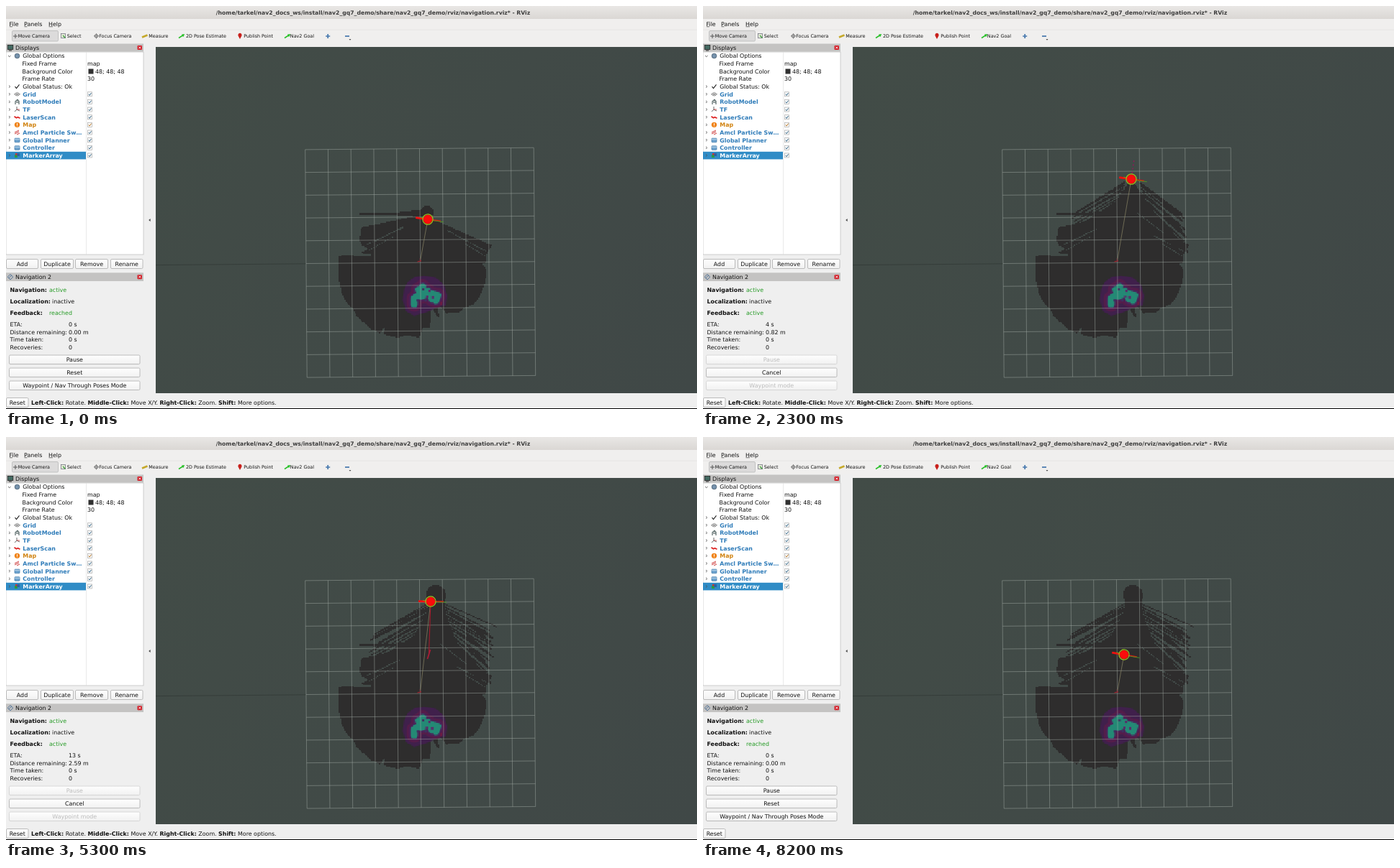
Write an HTML page with a canvas that moves like this. It is 960x561 px and loops after 8300 ms.

```html
<!DOCTYPE html>
<html lang="en">
<head>
<meta charset="utf-8">
<title>Navigation</title>
<style>
html, body { margin: 0; width: 100%; height: 100%; overflow: hidden; background: #efefef; }
canvas, svg { position: absolute; left: 0; top: 0; width: 960px; height: 561px; }
text { font: 7.9px "DejaVu Sans", sans-serif; fill: #111; white-space: pre; text-rendering: geometricPrecision; }
.b { font-weight: bold; }
.tool { font-size: 6.4px; }
.title { font-size: 7.7px; font-weight: bold; fill: #3d3d3d; }
.blue { fill: #2f7cb9; font-weight: bold; }
.orange { fill: #d0820f; font-weight: bold; }
.white { fill: #fff; font-weight: bold; }
.green { fill: #249a24; }
.off { fill: #bcbcbc; }
</style>
</head>
<body>
<canvas id="view" width="960" height="561"></canvas>
<svg id="ui" viewBox="0 0 960 561"></svg>
<script>
const LOOP = 8300, STEP = 100, METER = 31.7;
const $ = id => document.getElementById(id);
const rand = n => { const v = Math.sin(n * 127.1) * 43758.5; return v - Math.floor(v); };

// ---------- interface ----------
const text = (x, y, s, cls = '', more = '') => `<text x="${x}" y="${y + 2.9}" class="${cls}" ${more}>${s}</text>`;
const rect = (x, y, w, h, fill, more = '') => `<rect x="${x}" y="${y}" width="${w}" height="${h}" fill="${fill}" ${more}/>`;
const path = (d, color, w = 1) => `<path d="${d}" fill="none" stroke="${color}" stroke-width="${w}"/>`;
const middle = 'text-anchor="middle"', end = 'text-anchor="end"';

const button = (x, y, w, h, label, id = '') =>
  rect(x + .5, y + .5, w - 1, h - 1, 'url(#btn)', `rx="1.5" stroke="#b5b5b5" stroke-width=".9" ${id && `id="${id}Box"`}`) +
  text(x + w / 2, y + h / 2, label, '', `${middle} ${id && `id="${id}"`}`);

const header = (y, h, label) =>
  rect(0, y, 191, h, '#c4c3c2') + text(13, y + h / 2, label) +
  rect(182.5, y + h / 2 - 3, 6.5, 6, '#d3202a', 'rx="1"') +
  path(`M184.4 ${y + h / 2 - 1.4}l2.8 2.8m0-2.8l-2.8 2.8`, '#fff', .9);

function tools() {
  const items = [[61, 'Move Camera'], [104.5, 'Select'], [174.5, 'Focus Camera'], [225.5, 'Measure'],
    [306, '2D Pose Estimate'], [371, 'Publish Point'], [428, 'Nav2 Goal']];
  const goal = x => path(`M${x} 44.5l7-4.5m-2.8 .3l2.8-.3-1 2.6`, '#2bc02b', 1.5);
  return rect(8.5, 34.5, 64, 14.5, '#dcdbdb', 'id="camBox" rx="1.5" stroke="#b9b9b9" stroke-width=".8"') +
    rect(384.5, 34.5, 55.5, 14.5, '#dcdbdb', 'id="goalBox" rx="1.5" stroke="#b9b9b9" stroke-width=".8"') +
    items.map(([x, s]) => text(x, 41.4, s, 'tool', end)).join('') +
    path('M10 42h6m-3-3v6', '#555') +
    rect(76.5, 38.5, 6, 6, '#e6ecd8', 'stroke="#667" stroke-width=".7"') + path('M79 41l3.5 3.5', '#3a9a3a', 1.2) +
    '<circle cx="125.5" cy="41.8" r="2.3" fill="none" stroke="#555" stroke-width=".8"/>' + path('M121.8 41.8h7.4m-3.7-3.7v7.4', '#666', .7) +
    path('M189 43.5l7.5-3', '#c5a92b', 2.6) + goal(240) + goal(387) +
    '<path d="M325 46l-2.4-4.6a2.6 2.6 0 1 1 4.8 0z" fill="#c8201c"/>' +
    path('M444.2 42h6m-3-3v6', '#4476ad', 1.7) + path('M471 42h6', '#4476ad', 1.7) +
    '<path d="M476.5 46h3l-1.5 1.7z" fill="#444"/>';
}

function tree() {
  const rows = [['Global Options', ''], ['Fixed Frame', '', 'map'], ['Background Color', '', '48; 48; 48'], ['Frame Rate', '', '30'],
    ['Global Status: Ok', ''], ['Grid', 'blue'], ['RobotModel', 'blue'], ['TF', 'blue'], ['LaserScan', 'blue'], ['Map', 'orange'],
    ['Amcl Particle Sw…', 'blue'], ['Global Planner', 'blue'], ['Controller', 'blue'], ['MarkerArray', 'white']];
  const icons = {
    0: y => `<circle cx="15.5" cy="${y}" r="3.3" fill="#7793ad" stroke="#43586c" stroke-width=".8"/>`,
    4: y => path(`M12.5 ${y}l2 2.5 4-5.2`, '#222', 1.1),
    5: y => path(`M11.5 ${y}l4-2.4 4 2.4-4 2.4zm2-1.2l4 2.4m0-2.4l-4 2.4`, '#555', .7),
    6: y => path(`M13 ${y + 3.5}v-4l3-2.5 2 2v4.5m-4-3h4`, '#566', 1.2),
    7: y => path(`M12 ${y + 3}l3-3 4 2m-4-2v-4`, '#666', 1) + path(`M15 ${y}h4`, '#c33', .8),
    8: y => path(`M11.5 ${y - 1}l3 2 2-1 3 1.5`, '#d22', 1.8),
    9: y => `<circle cx="15.5" cy="${y}" r="3.7" fill="#f08418"/>` + path(`M15.5 ${y - 2.2}v2.8m0 .7v1`, '#fff', 1),
    10: y => path(`M12 ${y}l6-3m-6 5l6-3m-3 4l4-2`, '#c33', 1),
    11: y => rect(12, y - 2.5, 7, 5.5, '#6fa4cf', 'rx=".7" stroke="#3c77a8" stroke-width=".7"') + path(`M12 ${y - 1}h7`, '#d7e8f4', .8),
    13: y => rect(12, y - 1, 4, 4, '#2d9b43') + rect(15, y - 3, 4, 4, '#3160a0') + rect(13, y - 3, 2.4, 2.4, '#c33')
  };
  icons[12] = icons[11];
  return rect(0, 64, 191, 282, '#fff', 'stroke="#bbb" stroke-width=".7"') + rect(111, 64, .6, 282, '#ddd') +
    rect(0, 202.8, 111, 10.6, '#308cc6') +
    rows.map(([name, cls, value], i) => {
      const y = 69.5 + i * 10.65;
      let s = text(i && (i < 4 || i === 4) ? (i < 4 ? 22.5 : 23.3) : 23.3, y, name, cls);
      if (value) s += text(i === 2 ? 124 : 113, y, value);
      if (icons[i]) s += icons[i](y);
      if (i > 3) s += path(`M4 ${y - 1.6}l1.7 1.6-1.7 1.6`, '#555', .9);
      if (i > 4) s += rect(113.4, y - 3, 6, 6, '#fff', 'stroke="#aaa" stroke-width=".7"') +
        path(`M114.8 ${y}l1.4 1.7 2.3-3.4`, i === 9 ? '#b06d18' : '#2c5f80', 1);
      return s;
    }).join('') +
    path('M3 69l1.8 1.7 1.8-1.7', '#555', .9) + rect(114.5, 87.5, 7, 7, '#303030');
}

function buildUi() {
  const stops = (id, a, b) => `<linearGradient id="${id}" x2="0" y2="1"><stop stop-color="${a}"/><stop offset="1" stop-color="${b}"/></linearGradient>`;
  const field = (y, label, id, x, cls) => text(5.5, y, label, 'b') + text(x, y, '', cls, `id="${id}"`);
  const stat = (y, label, id) => text(5.5, y, label) + text(87, y, '0', '', `id="${id}"`);
  const hints = [['Left-Click:', ' Rotate. '], ['Middle-Click:', ' Move X/Y. '], ['Right-Click:', ' Zoom. '], ['Shift:', ' More options.']]
    .map(([k, v]) => `<tspan class="b">${k}</tspan>${v}`).join('');
  $('ui').innerHTML = `<defs>${stops('btn', '#fefefe', '#f1f1f1')}${stops('bar', '#e9e7e5', '#dad7d4')}</defs>` +
    rect(0, 0, 960, 18, 'url(#bar)') + rect(0, 18, 960, 39, '#f0efee') + rect(0, 32.8, 960, .6, '#dedddc') +
    rect(0, 51, 192, 489, '#efefef') + rect(192, 52, 16, 488, '#efefef') + rect(0, 539, 960, 22, '#efefef') +
    text(510, 9, '/home/tarkel/nav2_docs_ws/install/nav2_gq7_demo/share/nav2_gq7_demo/rviz/navigation.rviz* - RViz', 'title', middle) +
    text(4.5, 24.6, 'File') + text(25, 24.6, 'Panels') + text(59, 24.6, 'Help') +
    path('M5 28.8h4M25.5 28.8h4M59.5 28.8h5.5', '#222', .6) +
    tools() + header(52.5, 11, 'Displays') +
    rect(2.3, 54.5, 7.5, 6, '#446a62', 'stroke="#222" stroke-width=".8"') + path('M4 62h4', '#222') +
    tree() +
    button(0, 352, 45, 14, 'Add') + button(48, 352, 46, 14, 'Duplicate') + button(96, 352, 46, 14, 'Remove') + button(145, 352, 45.5, 14, 'Rename') +
    header(371.3, 11.7, 'Navigation 2') + path('M6 373.5l3.8 3.7-3.8 3.7-3.8-3.7zm-2 5l4-3.6', '#466b92', .9) +
    field(395, 'Navigation:', 'nav', 60, 'green') + field(411, 'Localization:', 'loc', 64) + field(427, 'Feedback:', 'feed', 60, 'green') +
    stat(443, 'ETA:', 'eta') + stat(453.7, 'Distance remaining:', 'dist') + stat(464.4, 'Time taken:', 'taken') + stat(475, 'Recoveries:', 'recov') +
    button(4, 485.5, 182.5, 13.5, 'Pause', 'pause') + button(4, 503.5, 182.5, 13.5, 'Reset', 'reset') + button(4, 521.5, 182.5, 13.5, '', 'way') +
    '<path d="M200.6 296v4l-2.4-2z" fill="#444"/>' +
    button(0, 545, 31.5, 14, 'Reset') + text(35, 551.6, hints, '', 'id="hints"') + rect(0, 560, 960, 1, '#000');
  $('nav').textContent = 'active';
  $('loc').textContent = 'inactive';
  $('taken').textContent = '0 s';
}

// ---------- motion ----------
// time, x, y, heading
const track = [[0, 586, 297, 8], [600, 586, 297, 8], [1500, 590, 267, 7], [2300, 595, 241, 8], [2900, 598, 222.5, 10], [4200, 598, 222.5, 10],
  [4750, 595, 220, 95], [5300, 590, 229, 181], [6700, 588, 273, 181], [7700, 585, 303, 190], [LOOP, 585, 303, 190]];
function pose(t) {
  const i = track.findIndex(k => k[0] > t), a = track[i - 1], b = track[i];
  const u = (t - a[0]) / (b[0] - a[0]);
  const [, x, y, deg] = a.map((v, j) => v + (b[j] - v) * u);
  return { x, y, turn: deg % 180 * Math.PI / 180 };
}
const within = (t, ...spans) => spans.some(([a, b]) => t >= a && t < b);
const goals = [{ x: 598.7, y: 215.2 }, { x: 585.5, y: 311 }];

// ---------- map ----------
const CELL = 1.6, MX = 440, MY = 190;
const mask = document.createElement('canvas');
mask.width = 170; mask.height = 182;
const m = mask.getContext('2d', { willReadFrequently: true });
const shape = s => new Path2D('M' + s + 'Z');
const scanned = shape('574 291 509 305 494 308 491 326 495 333 503 338 494 343 498 346 508 344 507 349 485 349 482 346 463 348 462 378 466 398 474 414 482 421 487 432 498 441 506 449 520 455 527 445 525 457 545 462 556 458 574 462 579 448 589 448 591 420 601 434 600 415 607 422 612 428 622 426 630 426 637 420 648 416 656 408 662 395 666 384 667 366 661 359 668 356 667 346 675 333 600 300');
const spur = shape('491 288 545 287 575 284 580 292 520 291 491 291');

function line(c, x1, y1, x2, y2, w, color) {
  c.lineWidth = w;
  c.strokeStyle = color;
  c.beginPath(); c.moveTo(x1, y1); c.lineTo(x2, y2); c.stroke();
}

function paintMask(t) {
  const top = pose(Math.min(t, 2900));
  m.setTransform(1, 0, 0, 1, 0, 0);
  m.clearRect(0, 0, mask.width, mask.height);
  m.setTransform(1 / CELL, 0, 0, 1 / CELL, -MX / CELL, -MY / CELL);
  m.fillStyle = '#000';
  m.fill(scanned);
  m.globalCompositeOperation = 'destination-out';
  line(m, 500, 333, 552, 308, 1.7);
  line(m, 503, 341, 538, 321, 1.2);
  line(m, 612, 312, 668, 342, 1.6);
  line(m, 638, 331, 667, 349, 1.3);
  m.globalCompositeOperation = 'source-over';
  m.fill(spur);
  m.beginPath(); m.arc(585, 287, 9, 0, 7); m.fill();
  const y = top.y + 5;
  if (t >= 700) m.fill(shape(`${top.x - 4} ${y} ${top.x + 4} ${y} 628 290 640 310 555 300`));
  if (t >= 1000) {
    m.fill(shape('585 282 599 282 675 333 600 312 497 309 540 297'));
    m.globalCompositeOperation = 'destination-out';
    line(m, 603, 288, 640, 316, 1.5);
    m.globalCompositeOperation = 'source-over';
  }
  // each passing scan leaves a pair of thin rays
  for (let k = 0; k < 15; k++) {
    const oy = 228 + k * 4.1;
    if (top.y > oy - 2) continue;
    const late = t >= 4200 && k < 10 ? 8 : 0, w = 1.5 + rand(k) * 1.2;
    line(m, 591 - k * 1.2, oy + 1, 515 - late + rand(k + 20) * 14 - k * .6, oy + 39 + late * .5, w, '#000');
    line(m, 604 + k * .8, oy + 2, 674 + late - rand(k + 40) * 12, oy + 41 + k * 1.2 - late * .6, w, '#000');
    if (k % 3 === 1) line(m, 640, oy + 26 + k, 668 - rand(k) * 6, oy + 46 + k * 1.4, 3, '#000');
  }
  if (t >= 4400) {
    m.beginPath(); m.ellipse(597, 219, 13.5, 13, 0, 0, 7); m.fill();
    m.fill(shape('584 218 611 218 609 238 604 246 588 246'));
  }
  const img = m.getImageData(0, 0, mask.width, mask.height), d = img.data;
  for (let i = 0; i < d.length; i += 4) {
    d[i] = 46; d[i + 1] = 45; d[i + 2] = 45;
    d[i + 3] = d[i + 3] > 115 ? 255 : 0;
  }
  m.putImageData(img, 0, 0);
}

const halo = shape('551 409 553 394 558 384 568 377 581 375 597 378 608 387 613 403 611 417 599 419 582 427 567 431 556 425');
const core = new Path2D('M567 415L567 407L575 401L579 391M573 395L577 404L588 400L600 403L597 410M586 397L592 408');
function paintCosts(t) {
  m.setTransform(1, 0, 0, 1, 0, 0);
  m.clearRect(0, 0, mask.width, mask.height);
  m.setTransform(1 / CELL, 0, 0, 1 / CELL, -MX / CELL, -MY / CELL);
  m.lineJoin = m.lineCap = 'round';
  m.fillStyle = '#40204c';
  m.fill(halo);
  for (const [w, color] of [[21, '#551d49'], [15, '#4b2358'], [9.5, '#248975']]) {
    m.lineWidth = w; m.strokeStyle = color; m.stroke(core);
  }
  const holes = [[570, 408], [583, 403], [580, 408], [590, 404], [576, 393], [586, 395]];
  holes.forEach(([x, y], i) => {
    m.fillStyle = i % 2 ? '#5b2a6a' : '#3f3160';
    m.fillRect(x + rand(i + t / 100) * 2, y, 3.2, 3.2);
  });
  m.fillStyle = '#7d1d3c';
  m.fillRect(604, 412, 2, 4);
  m.lineCap = 'butt';
}

// ---------- view ----------
const c = $('view').getContext('2d');
const shade = c.createLinearGradient(208, 57, 960, 539);
shade.addColorStop(0, '#424c47');
shade.addColorStop(1, '#404847');

function stamp() { c.drawImage(mask, MX, MY, mask.width * CELL, mask.height * CELL); }

function grid() {
  for (let i = 0; i <= 10; i++) {
    const a = i * 31.75, b = i * .25;
    line(c, 415.7 + a, 199.9 - b, 418.2 + a, 517 - b, .8, 'rgba(165,175,168,.58)');
    line(c, 415.7 + b, 199.9 + a * .999, 733.2 + b, 197.2 + a * .999, .8, 'rgba(165,175,168,.58)');
  }
}

function robot({ x, y, turn }) {
  c.save();
  c.translate(x, y);
  c.rotate(turn);
  line(c, -17, 0, 0, 0, 2.8, '#f01010');
  line(c, 0, 0, 18, 0, 2, '#d81414');
  line(c, 7, .6, 22, .6, .9, '#4f9a20');
  line(c, -11, -1.2, -7, -1.2, .9, '#6aa01c');
  c.beginPath(); c.arc(0, 0, 6.2, 0, 7); c.fillStyle = '#fa0c0c'; c.fill();
  c.beginPath(); c.arc(0, 0, 7.1, 0, 7); c.lineWidth = 1.2; c.strokeStyle = '#9fc41e'; c.stroke();
  c.restore();
}

function drawView(t, bot) {
  c.fillStyle = shade;
  c.fillRect(208, 57, 752, 482);
  line(c, 208, 360.6, 417, 358.8, .9, '#343c38');
  c.imageSmoothingEnabled = false;
  paintMask(t);
  stamp();
  paintCosts(t);
  stamp();
  grid();
  line(c, bot.x, bot.y, 575.5, 355, .8, 'rgba(160,155,115,.7)');
  line(c, 571.5, 356, 577, 354.6, 1.2, '#a82430');
  line(c, 575, 351.5, 575.5, 355, .8, '#8a3040');
  if (within(t, [700, 2900])) {
    c.setLineDash([2, 3.2]);
    line(c, goals[0].x, goals[0].y, bot.x, bot.y, 1.5, '#8f1c58');
    c.setLineDash([]);
  }
  if (within(t, [4000, 7900])) {
    line(c, bot.x, bot.y, 587.5, Math.max(302, bot.y), 1.1, t < 6000 ? '#a51b2d' : '#7c1d4c');
    if (bot.y < 296) line(c, 589.5, 296, 585.5, 309, 1.8, '#a81d36');
  }
  robot(bot);
}

// ---------- loop ----------
const put = (id, s) => { $(id).textContent = s; };
function drawUi(t, bot) {
  const picking = within(t, [200, 600], [3300, 3900]);
  const busy = within(t, [600, 2900], [3900, 8100]);
  const goal = goals[t < 3500 ? 0 : 1];
  const left = busy ? Math.hypot(goal.x - bot.x, goal.y - bot.y) / METER : 0;
  put('feed', busy || within(t, [8100, 8200]) ? 'active' : 'reached');
  put('eta', Math.round(left * 5) + ' s');
  put('dist', left.toFixed(2) + ' m');
  put('reset', busy ? 'Cancel' : 'Reset');
  put('way', busy ? 'Waypoint mode' : 'Waypoint / Nav Through Poses Mode');
  for (const id of ['pause', 'way']) {
    $(id).setAttribute('class', busy ? 'off' : '');
    $(id + 'Box').setAttribute('stroke', busy ? '#d3d3d3' : '#b5b5b5');
  }
  $('camBox').style.display = picking ? 'none' : '';
  $('goalBox').style.display = picking ? '' : 'none';
  $('hints').style.display = picking || t >= 7800 ? 'none' : '';
}

let last = -1;
function frame(now) {
  const t = Math.floor(now % LOOP / STEP) * STEP;
  if (t !== last) {
    const bot = pose(t);
    drawView(t, bot);
    drawUi(t, bot);
    last = t;
  }
  requestAnimationFrame(frame);
}
buildUi();
frame(performance.now());
</script>
</body>
</html>
```
